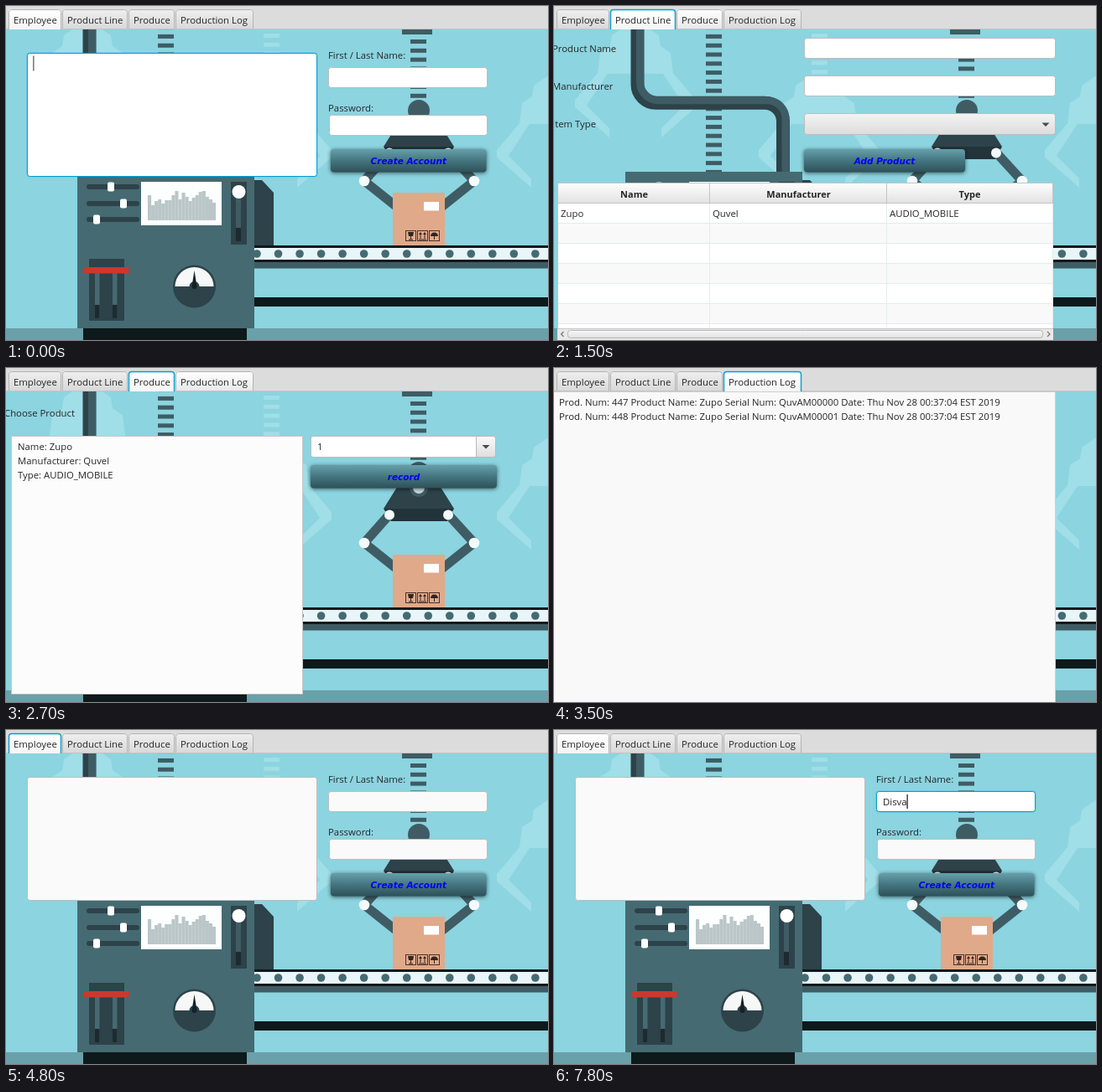
An HTML page with a canvas that plays this animation: 646 by 399 pixels, repeating every 8000 ms.

```html
<!DOCTYPE html>
<html lang="en">
<head>
<meta charset="utf-8">
<title>Production line</title>
<style>
  html, body { margin: 0; width: 100%; height: 100%; overflow: hidden; }
  canvas { display: block; }
</style>
</head>
<body>
<canvas id="stage" width="646" height="399"></canvas>
<script>
const ctx = document.getElementById('stage').getContext('2d');
const LOOP = 8000;
const SANS = '11.35px "Open Sans", sans-serif';
const HEAD = 'bold 11px "Open Sans", sans-serif';
const FUN = 'italic bold 10.5px "DejaVu Sans", sans-serif';
const SKY = '#8bd4e0', GHOST = '#a0dee8', BODY = '#456a72', STEEL = '#3f5c64',
      DARK = '#2d4249', BLACK = '#0d191b', PALE = '#f3fafb', INK = '#262626', BLUE = '#039ed3';

const PRODUCT = { name: 'Zupo', maker: 'Quvel', type: 'AUDIO_MOBILE' };
const TYPED = 'Disva';
const TABS = [['Employee', 3, 63], ['Product Line', 67, 78], ['Produce', 146, 55], ['Production Log', 202, 93]];

function rect(x, y, w, h, fill) {
  ctx.fillStyle = fill;
  ctx.fillRect(x, y, w, h);
}
function poly(fill, ...p) {
  ctx.beginPath();
  for (let i = 0; i < p.length; i += 2) ctx.lineTo(p[i], p[i + 1]);
  ctx.fillStyle = fill;
  ctx.fill();
}
function line(color, width, ...p) {
  ctx.beginPath();
  for (let i = 0; i < p.length; i += 2) ctx.lineTo(p[i], p[i + 1]);
  ctx.strokeStyle = color;
  ctx.lineWidth = width;
  ctx.stroke();
}
function disc(x, y, r, fill, from = 0, to = Math.PI * 2) {
  ctx.beginPath();
  ctx.arc(x, y, r, from, to);
  ctx.fillStyle = fill;
  ctx.fill();
}
function round(x, y, w, h, r, fill, stroke) {
  ctx.beginPath();
  ctx.roundRect(x, y, w, h, r);
  if (fill) { ctx.fillStyle = fill; ctx.fill(); }
  if (stroke) { ctx.strokeStyle = stroke; ctx.lineWidth = 1; ctx.stroke(); }
}
function fade(y0, y1, ...colors) {
  const g = ctx.createLinearGradient(0, y0, 0, y1);
  colors.forEach((c, i) => g.addColorStop(i / (colors.length - 1), c));
  return g;
}
function text(s, x, y, font = SANS, color = INK, align = 'left') {
  ctx.font = font;
  ctx.fillStyle = color;
  ctx.textAlign = align;
  ctx.fillText(s, x, y);
}

/* Factory backdrop */
function chain(x, top, bottom, color) {
  for (let y = top; y < bottom; y += 10.8) rect(x, y, 19, 5, color);
}
function ghostArm(cx, dy) {
  ctx.save();
  ctx.translate(cx, dy);
  disc(0, 100, 12, GHOST);
  for (const side of [-1, 1]) {
    ctx.save();
    ctx.scale(side, 1);
    poly(GHOST, 0, 84, 12, 84, 28, 95, 30, 108, 42, 116, 45, 140, 72, 172, 72, 181,
      31, 217, 31, 206, 58, 179, 33, 141, 0, 141);
    ctx.restore();
  }
  ctx.restore();
}
function pipe() {
  const trace = (offset, width, color) => {
    ctx.beginPath();
    ctx.moveTo(99.5 + offset, 28);
    ctx.arcTo(99.5 + offset, 115.7 - offset, 140, 115.7 - offset, 22);
    ctx.arcTo(273 + offset, 115.7 - offset, 273 + offset, 150, 22);
    ctx.lineTo(273 + offset, 200);
    ctx.strokeStyle = color;
    ctx.lineWidth = width;
    ctx.stroke();
  };
  trace(0, 16, DARK);
  trace(3, 9, STEEL);
}
function robot() {
  rect(472, 28, 36, 6, STEEL);
  chain(482, 40, 112, STEEL);
  disc(492, 125, 13, STEEL);
  poly(DARK, 470, 136, 514, 136, 534, 168, 450, 168);
  poly('#22343a', 450, 168, 534, 168, 526, 183, 459, 183);
  disc(492, 143, 11, STEEL);
  disc(492, 143, 7, '#c8dde1');
  for (const [sx, ex, hx] of [[457, 427, 467], [527, 558, 518]]) {
    line(STEEL, 11, sx, 175, ex, 209);
    line(STEEL, 11, ex, 209, hx, 241);
    disc(sx, 175.5, 6, PALE);
    disc(ex, 209, 6.3, PALE);
  }
}
function crate() {
  rect(461, 223, 62, 63, '#e0a98a');
  rect(498, 234, 18, 10.5, '#ffffff');
  for (const x of [476.5, 490.5, 504.5]) {
    ctx.strokeStyle = '#4a3228';
    ctx.lineWidth = 1;
    ctx.strokeRect(x, 268.5, 12, 12);
  }
  poly('#32241e', 479, 270, 486, 270, 485, 275, 480, 275);
  line('#32241e', 1, 482.5, 275, 482.5, 279);
  line('#32241e', 1, 480, 279, 485, 279);
  for (const x of [494, 499]) {
    line('#32241e', 1, x, 271, x, 278);
    poly('#32241e', x - 2, 273, x, 270, x + 2, 273);
  }
  line('#32241e', 1, 492, 279, 501, 279);
  disc(510.5, 275, 4.5, '#32241e', Math.PI, 0);
  line('#32241e', 1, 510.5, 274, 510.5, 279);
}
function conveyor() {
  rect(290, 286, 356, 20, BLACK);
  rect(290, 289, 356, 14, '#e9f6f9');
  for (let x = 299; x < 646; x += 25.53) disc(x, 296, 4.8, BODY);
  rect(290, 306, 356, 7.5, STEEL);
  rect(290, 348, 356, 11, BLACK);
}
function machine() {
  poly(DARK, 290, 208, 305, 208, 319, 223, 319, 286, 290, 286);
  rect(85, 198, 211, 187, BODY);
  for (const [y, knob] of [[216, 121], [236, 136], [255, 104]]) {
    round(96, y - 3, 63, 6, 3, DARK);
    round(knob, y - 5.5, 8, 11, 2, '#ffffff');
  }
  rect(161, 210, 96, 52, '#fdfefe');
  const bars = [30, 18, 23, 25, 20, 24, 24, 30, 35, 25, 33, 28, 23, 27, 30, 34, 35, 28, 25, 21];
  bars.forEach((h, i) => rect(169 + i * 4.05, 256 - h, 4.1, h, '#bac6c8'));
  rect(268, 210, 19, 75, DARK);
  rect(274, 215, 6, 66, STEEL);
  rect(274, 265, 6, 16, '#1d2b30');
  disc(277.5, 222, 8, '#ffffff');
  rect(99, 302, 42, 74, DARK);
  for (const x of [106, 127]) {
    rect(x, 319, 5.5, 54, BODY);
    rect(x, 357, 5.5, 16, '#1d2b30');
  }
  round(92.5, 312, 54, 7.5, 1, '#cd372c');
  disc(224.5, 335, 25.5, DARK);
  disc(224.5, 335, 23, '#f6f8f8', Math.PI, 0);
  disc(224.5, 335, 6, DARK);
  poly('#152126', 221.5, 335, 224.5, 316, 227.5, 335);
  disc(224.5, 335, 3, '#152126');
}
function factory() {
  rect(0, 0, 646, 399, SKY);
  ghostArm(97, -60);
  chain(307, 33, 88, GHOST);
  ghostArm(316, 0);
  ghostArm(657, 0);
  rect(0, 385, 646, 14, '#6aa0aa');
  rect(92, 385, 195, 14, BLACK);
  chain(181, 23.1, 198, STEEL);
  pipe();
  conveyor();
  machine();
  robot();
  crate();
}

/* Controls */
function tabBar(selected, hover, focused) {
  rect(0, 0, 646, 28, '#dcdcdc');
  rect(0, 27, 646, 1, '#c3c3c3');
  TABS.forEach(([label, x, w], i) => {
    const on = i === selected;
    const fill = on ? fade(4, 27, '#ffffff', '#f5f5f5')
      : i === hover ? fade(4, 27, '#ffffff', '#e9e9e9') : fade(4, 27, '#efefef', '#d9d9d9');
    const h = on ? 24 : 23;
    round(x, 4, w, h, [3, 3, 0, 0], fill);
    const ring = on && focused;
    ctx.beginPath();
    ctx.moveTo(x + .5, 4 + h);
    ctx.arcTo(x + .5, 4.5, x + 9, 4.5, 3);
    ctx.arcTo(x + w - .5, 4.5, x + w - .5, 20, 3);
    ctx.lineTo(x + w - .5, 4 + h);
    ctx.strokeStyle = ring ? BLUE : '#b4b4b4';
    ctx.lineWidth = ring ? 1.4 : 1;
    ctx.stroke();
    text(label, x + 6, 21);
  });
}
function field(x, y, w, h, focused, fill = '#ffffff') {
  if (focused) round(x - .5, y - .5, w + 1, h + 1, 4, 'rgba(3,158,211,.35)');
  round(x + .5, y + .5, w - 1, h - 1, 3, fill, focused ? BLUE : '#bdbdbd');
}
function button(label, x, y, w) {
  ctx.save();
  ctx.shadowColor = 'rgba(0,0,0,.6)';
  ctx.shadowBlur = 5;
  ctx.shadowOffsetY = 1;
  round(x, y, w, 27.5, 4, fade(y, y + 28, '#669faa', '#44757f', '#2d4f57'));
  ctx.restore();
  text(label, x + w / 2, y + 18, FUN, '#0000ff', 'center');
}

/* Pages */
function employee(t) {
  const returned = t >= 4800, typing = t >= 5900;
  const paper = returned ? '#fafafa' : '#ffffff';
  field(25, 56, 346, 148, !returned, paper);
  if (t < 100 || (t >= 600 && t < 1000)) rect(32, 59.5, 1.6, 18, '#7c7c7c');
  text('First / Last Name:', 384, 63);
  field(384, 73, 190, 25, typing, typing ? '#ffffff' : paper);
  text('Password:', 384, 126);
  field(385, 130, 189, 25, false, paper);
  button('Create Account', 387, 171, 185.5);
  if (typing) {
    const typed = TYPED.slice(0, [6800, 7100, 7300, 7500, 7800].filter(at => t >= at).length);
    text(typed, 392, 90);
    if (t < 6400 || typed) rect(391.5 + Math.round(ctx.measureText(typed).width), 77, 1.2, 17, '#111111');
  }
}
function productLine() {
  ['Product Name', 'Manufacturer', 'Item Type'].forEach((s, i) => text(s, -2, 55 + i * 45));
  field(298, 38, 300, 25);
  field(298, 83, 300, 25);
  field(298, 128, 300, 26, false, fade(128, 154, '#f4f4f4', '#dcdcdc'));
  poly('#4a4a4a', 581.5, 139.5, 590.5, 139.5, 586, 144);
  button('Add Product', 298, 171, 192);

  rect(4, 211, 591, 188, '#ffffff');
  rect(4, 211, 591, 25, fade(211, 236, '#ffffff', '#e1e1e1'));
  for (let i = 0; i < 7; i++) {
    const y = 236 + i * 24;
    if (i % 2) rect(4, y, 591, 24, '#f9f9f9');
    rect(4, y + 23, 591, 1, '#e5ebee');
  }
  for (const x of [185, 396, 594]) {
    rect(x, 236, 1, 150, '#e5ebee');
    rect(x, 211, 1, 25, '#c4c4c4');
  }
  rect(4, 211, 591, 1, '#c4c4c4');
  rect(4, 235, 591, 1, '#c4c4c4');
  rect(4, 211, 1, 188, '#c4c4c4');
  text('Name', 95.5, 228.5, HEAD, INK, 'center');
  text('Manufacturer', 291.5, 228.5, HEAD, INK, 'center');
  text('Type', 495.5, 228.5, HEAD, INK, 'center');
  text(PRODUCT.name, 8, 252);
  text(PRODUCT.maker, 189, 252);
  text(PRODUCT.type, 400, 252);

  rect(4, 385, 591, 14, '#e9e9e9');
  rect(4, 385, 591, 1, '#c8c8c8');
  round(16.5, 387.5, 566, 9, 3, fade(387, 397, '#f8f8f8', '#e0e0e0'), '#b5b5b5');
  line('#777777', 1.2, 11.5, 389, 8.5, 392, 11.5, 395);
  line('#777777', 1.2, 588, 389, 591, 392, 588, 395);
}
function produce() {
  text('Choose Product', -2, 58);
  round(6.5, 81.5, 347, 308, 0, '#fcfcfc', '#c6c6c6');
  text('Name: ' + PRODUCT.name, 14, 98);
  text('Manufacturer: ' + PRODUCT.maker, 14, 115);
  text('Type: ' + PRODUCT.type, 14, 132);
  field(363, 81, 221, 26);
  round(560.5, 81.5, 23, 25, [0, 3, 3, 0], fade(81, 107, '#fafafa', '#dedede'), '#b9b9b9');
  poly('#4a4a4a', 567.5, 92, 576.5, 92, 572, 96.5);
  text('1', 371, 98);
  button('record', 363, 116, 222);
}
function productionLog() {
  rect(0, 28, 598, 371, '#f9f9f9');
  rect(0, 28, 598, 1, '#cfcfcf');
  rect(597, 28, 1, 371, '#cfcfcf');
  for (const i of [0, 1]) {
    const serial = PRODUCT.maker.slice(0, 3) + 'AM0000' + i;
    text(`Prod. Num: ${447 + i} Product Name: ${PRODUCT.name} Serial Num: ${serial} Date: Thu Nov 28 00:37:04 EST 2019`,
      6, 45 + i * 17);
  }
}

const PAGES = [employee, productLine, produce, productionLog];
const PAGE_AT = [[0, 0], [1300, 1], [2300, 2], [3500, 3], [4800, 0]];
const HOVER_AT = [[0, -1], [800, 2], [900, 1], [1300, 2], [2300, -1], [2700, 3], [3500, -1],
                  [3900, 2], [4000, 1], [4500, 0], [4800, -1]];
const current = (steps, t) => steps.filter(([at]) => t >= at).pop()[1];

function draw(t) {
  const page = current(PAGE_AT, t);
  factory();
  tabBar(page, current(HOVER_AT, t), t >= 1300 && t < 5900);
  PAGES[page](t);
}

const start = performance.now();
function tick() {
  draw((performance.now() - start) % LOOP);
  requestAnimationFrame(tick);
}
tick();
</script>
</body>
</html>
```
